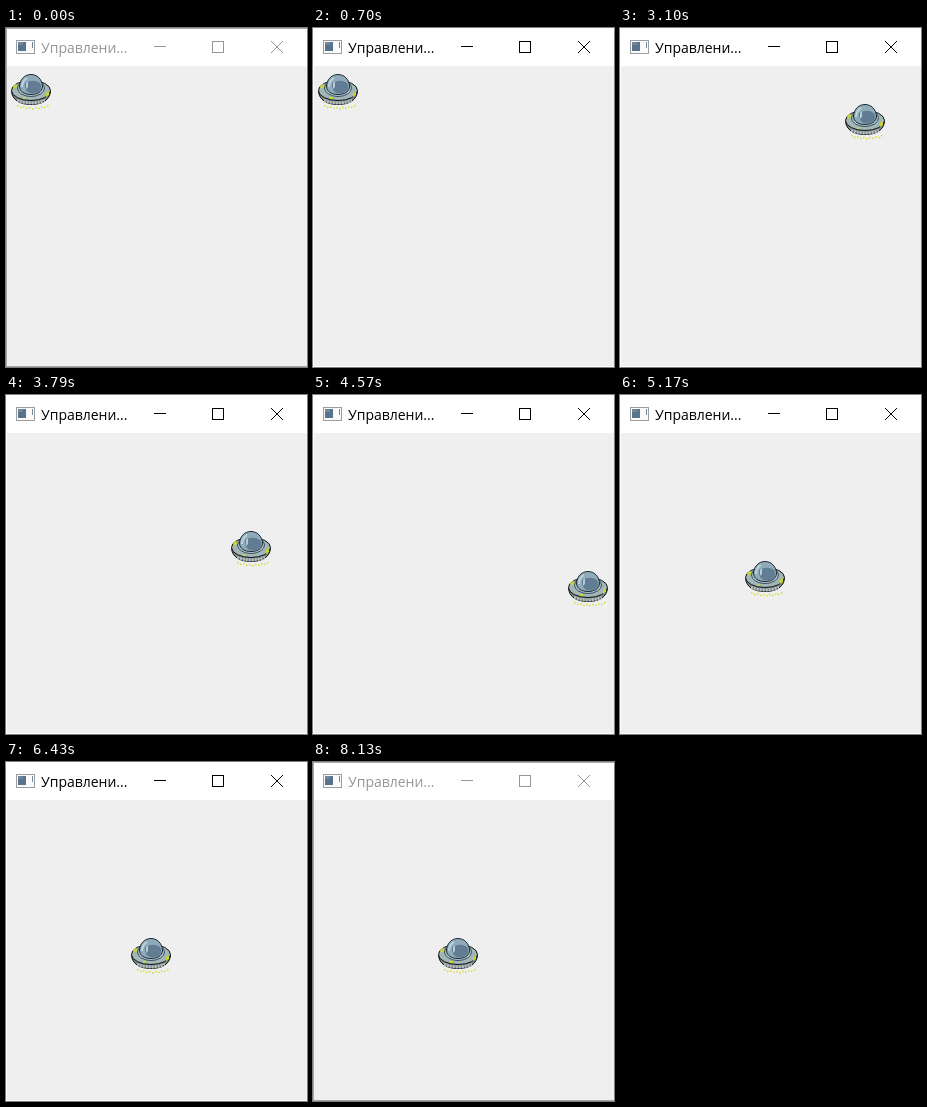
An HTML page for the animation above (8.23 s loop, 301x339 px).

```html
<!DOCTYPE html>
<html lang="ru">
<head>
<meta charset="utf-8">
<title>Управление</title>
<style>
  html, body { margin: 0; width: 100%; height: 100%; overflow: hidden; background: #fff; }
  svg { display: block; width: 100%; height: 100%; }
  text { font: 14px "Open Sans", "Noto Sans", sans-serif; }
  .crisp { shape-rendering: crispEdges; }
</style>
</head>
<body>
<svg viewBox="0 0 301 339">
  <rect width="301" height="339" fill="#fff"/>
  <rect x="1" y="38" width="300" height="300" fill="#efefef"/>

  <g class="crisp">
    <rect x="10.5" y="12.5" width="18" height="13" fill="#fafafa" stroke="#9a9ea0"/>
    <rect x="12" y="14" width="8" height="9" fill="#58748c"/>
    <path d="M12 14h5v3h-5z" fill="#6f8798"/>
    <path d="M26 14h1v6h-1z" fill="#74899a"/>
  </g>
  <text id="title" x="35" y="25">Управлени...</text>
  <g id="buttons" fill="none">
    <path class="crisp" d="M148 18.5h12M206.5 13.5h11v11h-11z"/>
    <path d="M265 13l12 12M277 13l-12 12"/>
  </g>

  <g id="ship">
    <path d="M.5 17C1 26 9 30.500 20 30.500S39 26 39.500 17z" fill="#7f8b8d" stroke="#111"/>
    <path d="M6 26.500Q20 31.500 34 26.500" fill="none" stroke="#b4bebe" stroke-width="3" stroke-dasharray="2 1"/>
    <ellipse cx="20" cy="16.500" rx="19.500" ry="10" fill="#a1b6b7" stroke="#111"/>
    <path d="M2 12l3-2 2 2-4 3zM35 19l3-2v4l-3 2zM12 23h3v2h-3z" fill="#c9d532"/>
    <ellipse cx="20" cy="14" rx="13.500" ry="8.500" fill="#b3cad1" stroke="#39495a"/>
    <path d="M8.500 12C9 5 14 .5 20 .5S31 5 31.500 12C31.500 18 26 20.500 20 20.500S8.500 18 8.500 12z" fill="#8fabb9" stroke="#1d2833"/>
    <path d="M14 9Q22 4.500 29 9Q33 18 22 19.500Q13 19 14 9z" fill="#617c93"/>
    <path d="M11 13Q11 7 16 4" fill="none" stroke="#bbd5dd" stroke-width="2"/>
    <path d="M15 9l2-2v6l-2 2z" fill="#b4ccd8"/>
    <g id="sparks" fill="#d4dc35"></g>
  </g>

  <path id="frame" class="crisp" d="M301 .5H.5V338.500H301" fill="none" stroke="#a5a8a8"/>
</svg>
<script>
const LOOP = 8230;
const KEY_STEP = 10, KEY_RATE = 30;  // px and ms per repeated key press
const REFRESH = 75;                  // ms between redraws while a key is held
const WRAP = 260, LEFT = 5, TOP = 46;

const RIGHT = [1, 0], DOWN = [0, 1], UP = [0, -1];
const presses = [
  { at: 1470, key: RIGHT },
  { at: 1950, key: RIGHT, count: 21 },
  { at: 2720, key: DOWN },
  { at: 2950, key: DOWN },
  { at: 3100, key: DOWN },
  { at: 3640, key: DOWN, count: 10 },
  { at: 4020, key: RIGHT },
  { at: 4570, key: RIGHT },
  { at: 4570, key: RIGHT, count: 14 },
  { at: 5170, key: UP },
  { at: 5650, key: UP, count: 25 },
];

const $ = id => document.getElementById(id);
const clamp = v => Math.min(1, Math.max(0, v));
const wrap = v => (v % WRAP + WRAP) % WRAP;

function repeats(t, { at, count = 1 }) {
  if (t < at) return 0;
  const held = Math.floor((t - at) / REFRESH) * REFRESH;
  return Math.min(count, Math.floor(held / KEY_RATE) + 1);
}

function shipAt(t) {
  let x = 0, y = 0;
  for (const press of presses) {
    const move = repeats(t, press) * KEY_STEP;
    x += press.key[0] * move;
    y += press.key[1] * move;
  }
  return [LEFT + wrap(x), TOP + wrap(y)];
}

// 0 = window in the background, 1 = window has focus
const focusAt = t => t >= 8130 ? 0 : clamp((t - 50) / 250);

function addSparks(n) {
  let dots = "";
  for (let i = 0; i < n; i++) {
    const y = 31 + 2 * Math.sin(Math.PI * i / (n - 1)) + i % 2;
    dots += `<rect x="${6 + 3 * i}" y="${y}" width="1.500" height="1.500"/>`;
  }
  $("sparks").innerHTML = dots;
}

function draw(t) {
  $("ship").setAttribute("transform", `translate(${shipAt(t)})`);

  const focus = focusAt(t);
  const grey = Math.round(150 * (1 - focus));
  const ink = `rgb(${grey},${grey},${grey})`;
  $("title").setAttribute("fill", ink);
  $("buttons").setAttribute("stroke", ink);
  $("frame").setAttribute("opacity", 1 - focus);
}

addSparks(11);
const start = performance.now();
function tick() {
  draw((performance.now() - start) % LOOP);
  requestAnimationFrame(tick);
}
tick();
</script>
</body>
</html>
```
